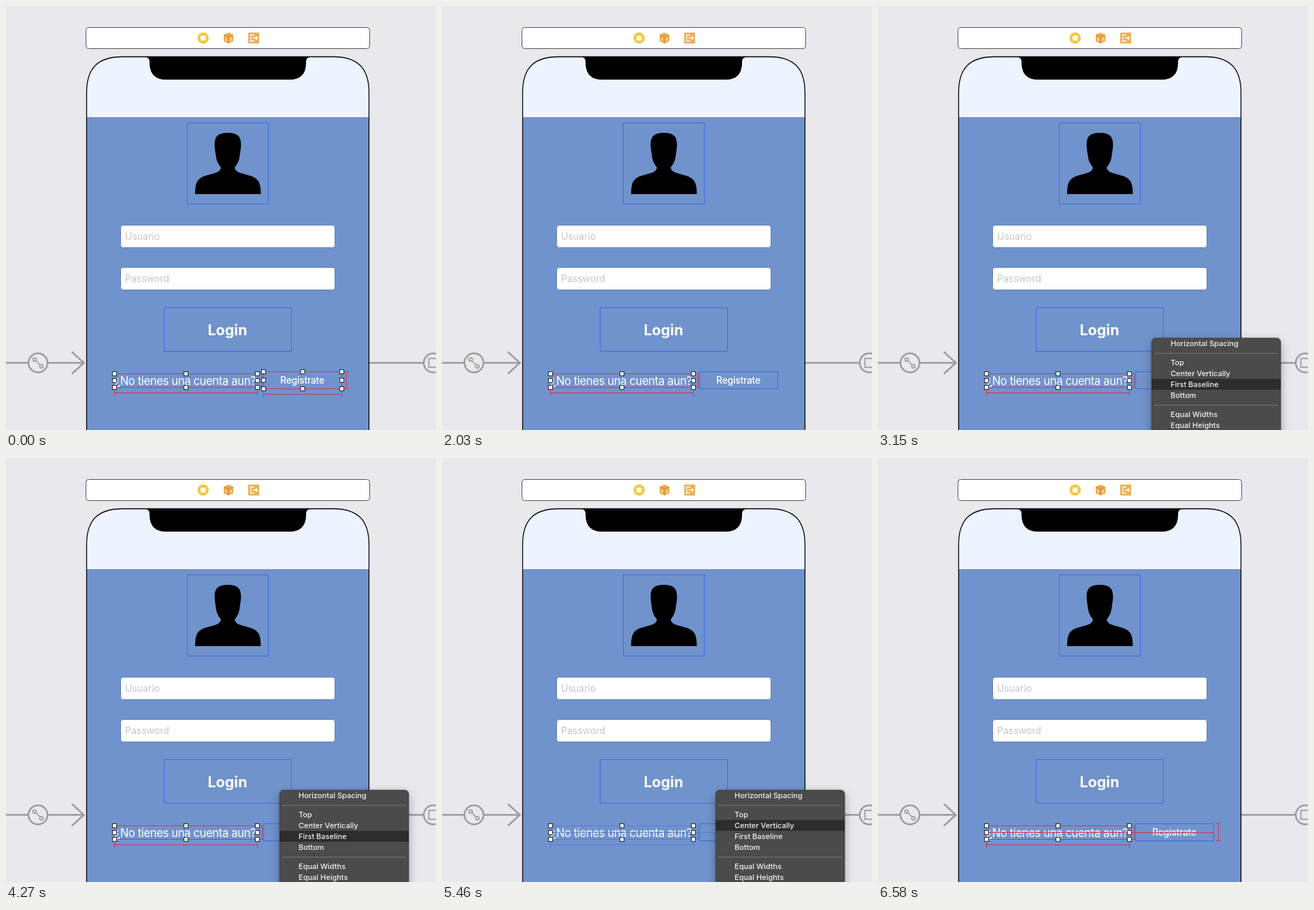
Write an HTML page that moves like this. It is 632 px wide and 622 px high and loops after 6650 ms.

```html
<!DOCTYPE html>
<html lang="es">
<head>
<meta charset="utf-8">
<style>
html, body { margin: 0; width: 100%; height: 100%; overflow: hidden; background: #e9e8ed; }
svg { display: block; width: 632px; height: 622px; font-family: Inter, Roboto, sans-serif; }
.frame { fill: none; stroke: #4269df; }
.gray { fill: none; stroke: #9b9b9e; stroke-width: 2.4; }
.field { fill: #fff; stroke: #5c7db6; }
.hint { fill: #c6c6c9; font-size: 14px; }
.rule { fill: none; stroke: #d43552; }
.rule.valid { stroke: #4b74d8; stroke-opacity: .7; }
.handle { fill: #fff; stroke: #34363d; stroke-width: 1.2; }
.menu text { fill: #f2f2f2; font-size: 11px; font-weight: 450; }
</style>
</head>
<body>
<svg viewBox="0 0 632 622">
  <defs>
    <filter id="shadow" x="-20%" y="-20%" width="140%" height="140%">
      <feDropShadow dx="0" dy="5" stdDeviation="7" flood-opacity=".3"/>
    </filter>
  </defs>
  <rect width="632" height="622" fill="#e9e8ed"/>

  <!-- Toolbar -->
  <rect x="117.5" y="31.5" width="417" height="31" rx="4" fill="#fff" stroke="#55555a"/>
  <circle cx="289.7" cy="47" r="8.2" fill="#f5c63c"/>
  <rect x="286" y="43.3" width="7.4" height="7.4" rx="1.5" fill="#fff"/>
  <path d="M327 39l7 3.2v9.6l-7 3.2-7-3.2v-9.6z" fill="#eda94d"/>
  <path d="M320 42.2l7 3.2 7-3.2M327 45.4v9.6" fill="none" stroke="#d58d30"/>
  <path d="M323.5 47v4M330.5 47v4" stroke="#fff" stroke-width="1.3"/>
  <rect x="356" y="39" width="16" height="16" rx="1" fill="#efb052"/>
  <path d="M365 42.5h-5.5v9h5.5M362.5 47h7m-2.5-2.5l2.5 2.5-2.5 2.5" fill="none" stroke="#fff" stroke-width="1.3"/>

  <!-- Scene arrows -->
  <g class="gray">
    <path d="M0 523.5H32M62 523.5H114M97 507.5l17.5 16-17.5 16M534 523.5h79"/>
    <circle cx="47" cy="523.5" r="14"/><circle cx="628" cy="523.5" r="14"/>
    <g stroke-width="1.7">
      <circle cx="42" cy="518.5" r="2.5"/><circle cx="52" cy="528.5" r="2.5"/>
      <path d="M44 520.5l6 6"/><rect x="621.5" y="517" width="13" height="13"/>
    </g>
  </g>

  <!-- Device -->
  <path d="M118.5 630V127C118.5 91 135 74.5 171 74.5H481C517 74.5 533.5 91 533.5 127V630z" fill="#edf4ff"/>
  <path d="M119 163H533V622H119z" fill="#7093cd"/>
  <path d="M118.5 630V127C118.5 91 135 74.5 171 74.5H481C517 74.5 533.5 91 533.5 127V630" fill="none" stroke="#000" stroke-width="1.3"/>
  <path d="M119 163.5H533" stroke="#8296b8" stroke-width=".7"/>
  <path d="M204 74.5Q211 75 211 82V85Q212 108 235 108H417Q440 108 441 85V82Q441 75 448 74.5z"/>
  <rect class="frame" x="266.5" y="171.5" width="119" height="119"/>
  <path d="M278 276C278 259 281 253 293 249C306 245 314 245 316 237C311 231 309 226 308 216C304 194 308 186 326 186C344 186 348 194 344 216C343 226 341 231 336 237C338 245 346 245 359 249C371 253 374.500 259 374.500 276z"/>
  <rect class="field" x="168.500" y="321.500" width="315" height="33" rx="4"/>
  <rect class="field" x="168.500" y="383.500" width="315" height="33" rx="4"/>
  <text class="hint" x="175" y="343">Usuario</text>
  <text class="hint" x="175" y="405">Password</text>
  <rect class="frame" x="232.5" y="442.5" width="187" height="64"/>
  <text x="325.5" y="482.5" text-anchor="middle" font-size="21.5" font-weight="700" fill="#fff">Login</text>
  <text x="159.5" y="555.5" font-size="16.7" letter-spacing="-.4" fill="#fff">¿No tienes una cuenta aun?</text>

  <!-- Drop target -->
  <rect id="target" x="372.5" y="530.5" width="127" height="37" rx="3" fill="#6397dc" stroke="#f4f8ff" stroke-width="1.3"/>
  <rect class="frame" x="378.5" y="536.5" width="115" height="25"/>
  <text id="button" x="435.5" y="554" text-anchor="middle" font-size="14" letter-spacing="-.3" font-weight="450" fill="#fff">Registrate</text>

  <!-- Constraints and selection -->
  <path id="labelRules" class="rule" d="M159 539.5H377M159 559.5H378M376.5 540V559M159.5 567.5H369.5M159.5 563v9M369.5 563v9"/>
  <path id="centerRule" class="rule" d="M159 549.5H494"/>
  <path id="heightRule" class="rule" d="M500.5 537V562M497 536.5h7M497 561.5h7"/>
  <path id="buttonRules" class="rule" d="M378.5 536.5H503M378.5 561.5H503M378.5 536V562M493.5 536V562M378.5 569.5H493.5M378.5 565v9M493.5 565v9"/>
  <g id="labelHandles" class="handle"></g>
  <g id="buttonHandles" class="handle"></g>

  <g id="link" fill="none" stroke="#b9d9f6">
    <path id="wire" stroke-width="3"/>
    <circle cx="345" cy="549.500" r="3" stroke-width="1.5"/>
    <circle id="wireEnd" cy="549.500" r="3" stroke-width="1.5" fill="#6d9fda"/>
  </g>
  <g id="tip">
    <rect x="466.5" y="557.5" width="67.500" height="21" rx="4.500" fill="#444349" stroke="#fff" stroke-width="1.3"/>
    <text x="500" y="572" text-anchor="middle" font-size="11" font-weight="700" fill="#fff">Registrate</text>
  </g>

  <g id="menu" class="menu">
    <rect x="402" y="487" width="190" height="160" rx="6" fill="#4b4b4c" stroke="#3c3c3d" stroke-width=".6" filter="url(#shadow)"/>
    <rect id="hover" x="402" width="190" height="16" fill="#2d2d2e"/>
    <path d="M406 509.500H588M406 585.500H588" stroke="#747475"/>
  </g>
</svg>
<script>
const LOOP = 6650;
const $ = id => document.getElementById(id);
const show = (id, on) => $(id).style.visibility = on ? 'visible' : 'hidden';
const between = (t, a, b) => t >= a && t < b;
const clamp = v => Math.max(0, Math.min(1, v));

function addHandles(id, x1, y1, x2, y2) {
  const xs = [x1, (x1 + x2) / 2, x2], ys = [y1, (y1 + y2) / 2, y2];
  let out = '';
  xs.forEach((x, i) => ys.forEach((y, j) => {
    if (i !== 1 || j !== 1) out += `<rect x="${x - 3}" y="${y - 3}" width="6" height="6"/>`;
  }));
  $(id).innerHTML = out;
}
addHandles('labelHandles', 159.5, 539.5, 369.5, 559.5);
addHandles('buttonHandles', 378.5, 536.5, 493.5, 561.5);

const items = { 'Horizontal Spacing': 495, Top: 523, 'Center Vertically': 539,
  'First Baseline': 555, Bottom: 571, 'Equal Widths': 599, 'Equal Heights': 615 };
for (const [name, y] of Object.entries(items))
  $('menu').insertAdjacentHTML('beforeend', `<text x="430" y="${y + 4}">${name}</text>`);

function draw(t) {
  const bothSelected = t < 1610;
  const dragging = between(t, 2380, 2940);
  const overButton = between(t, 2550, 2940);
  const settling = between(t, 5390, 5670);
  const constrained = t >= 5390;

  show('buttonHandles', bothSelected);
  show('buttonRules', bothSelected);
  show('heightRule', bothSelected || t >= 5670);
  show('centerRule', constrained);
  for (const id of ['labelRules', 'centerRule']) $(id).classList.toggle('valid', settling);

  show('target', overButton);
  show('tip', overButton);
  $('button').setAttribute('fill', overButton ? '#cfe1f8' : '#fff');

  show('link', dragging);
  const end = t < 2660 ? 345 + 38 * clamp((t - 2380) / 280) : 383 + 47 * clamp((t - 2660) / 240);
  $('wire').setAttribute('d', `M348 549.5H${Math.max(348, end - 3)}`);
  $('wireEnd').setAttribute('cx', end);

  show('menu', between(t, 2940, 5740));
  $('menu').style.opacity = 1 - clamp((t - 5530) / 210);
  $('hover').setAttribute('y', items[t < 4830 ? 'First Baseline' : 'Center Vertically'] - 8);
}

function tick() {
  draw(performance.now() % LOOP);
  requestAnimationFrame(tick);
}
tick();
</script>
</body>
</html>
```
